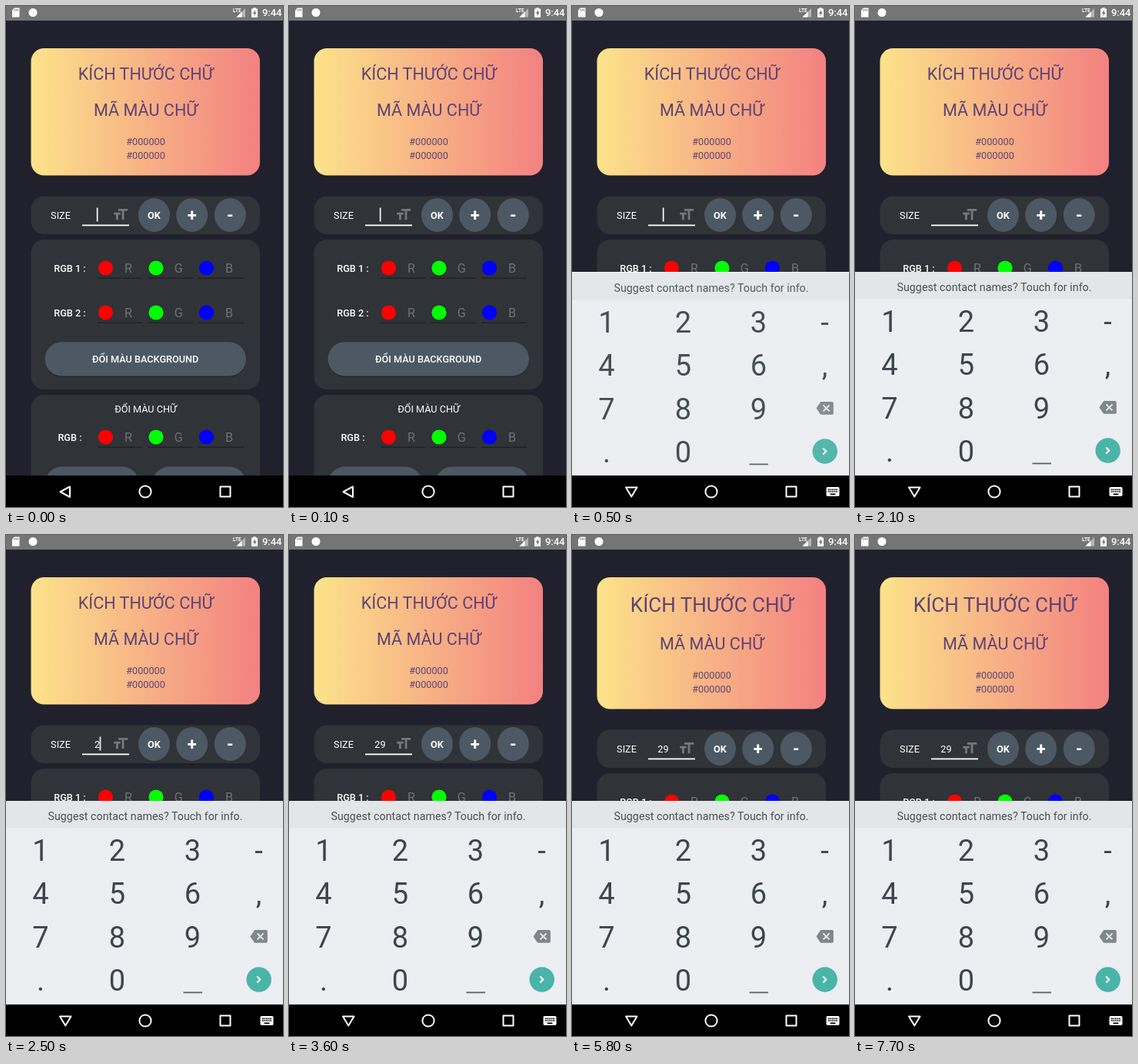
An HTML page that plays this animation: 360 px wide and 652 px high, repeating every 8 s.

```html
<!DOCTYPE html>
<html lang="vi">
<head>
<meta charset="utf-8">
<title>Text size demo</title>
<style>
html, body { margin: 0; width: 100%; height: 100%; overflow: hidden; background: #21212d; }
svg { display: block; width: 100vw; height: 100vh; }
text { font-family: Roboto, "Noto Sans", sans-serif; font-size: 12.7px; text-anchor: middle; fill: #fff; }
.m { font-weight: 500; }
.b { font-weight: 700; }
.sign { font-size: 22px; font-weight: 700; }
.card text { fill: #5d4374; }
.card .big { font-size: 21.6px; }
.hint { font-size: 16.2px; fill: #707275; }
.panel { fill: #303337; }
.btn { fill: #4c5864; }
.keys text { font-size: 38px; fill: #3c464b; }
.keys .tip { font-size: 14.3px; fill: #4a5256; }
.line { fill: none; stroke: #fff; stroke-width: 2; }

.grow, .tall, .shift, .caret, .one, .two, .press, .kb, .slide, .glass, .down, .back {
  animation: 8s step-end infinite;
}
.grow { animation-name: grow; }
.tall { animation-name: tall; }
.shift { animation-name: shift; }
.caret { animation-name: caret; }
.one { animation-name: one; }
.two { animation-name: two; }
.press { animation-name: press; }
.kb, .down { animation-name: show; }
.back { animation-name: hide; }
.slide { animation-name: slide; }
.glass { animation-name: glass; }

@keyframes grow {
  0% { font-size: 21.6px; transform: translateY(0); }
  72.5%, 96.25%, 100% { font-size: 26px; transform: translateY(4.2px); }
  93.75% { font-size: 26.9px; transform: translateY(5px); }
}
@keyframes tall {
  0% { height: 165.5px; }
  72.5%, 96.25%, 100% { height: 171.5px; }
  93.75% { height: 172.5px; }
}
@keyframes shift {
  0% { transform: translateY(0); }
  72.5%, 96.25%, 100% { transform: translateY(6px); }
  93.75% { transform: translateY(7px); }
}
@keyframes caret {
  0%, 20% { opacity: 1; transform: translateX(0); }
  13.75%, 26.25% { opacity: 0; transform: translateX(0); }
  28.75% { opacity: 1; transform: translateX(3.7px); }
  35% { opacity: 0; transform: translateX(3.7px); }
  38.75%, 51.25%, 63.75%, 76.25%, 88.75% { opacity: 1; transform: translateX(7.3px); }
  45%, 57.5%, 70%, 82.5%, 95%, 100% { opacity: 0; transform: translateX(7.3px); }
}
@keyframes one {
  0%, 38.75%, 100% { visibility: hidden; }
  28.75% { visibility: visible; }
}
@keyframes two {
  0% { visibility: hidden; }
  38.75%, 100% { visibility: visible; }
}
@keyframes press {
  0%, 28.75%, 100% { opacity: 0; }
  27.5% { opacity: 1; }
}
@keyframes show {
  0% { visibility: hidden; }
  5%, 100% { visibility: visible; }
}
@keyframes hide {
  0% { visibility: visible; }
  5%, 100% { visibility: hidden; }
}
@keyframes slide {
  0%, 5% { transform: translateY(40px); opacity: .6; }
  6.25% { transform: translateY(1px); opacity: .95; }
  7.5%, 100% { transform: translateY(0); opacity: 1; }
}
@keyframes glass {
  0%, 6.25%, 100% { visibility: hidden; }
  5% { visibility: visible; }
}
</style>
</head>
<body>
<svg viewBox="0 0 360 652" preserveAspectRatio="none">
  <defs>
    <linearGradient id="warm">
      <stop offset="0" stop-color="#fce38a"/>
      <stop offset="1" stop-color="#f38181"/>
    </linearGradient>
    <clipPath id="kbArea"><rect y="346" width="360" height="265"/></clipPath>
    <clipPath id="navArea"><rect y="611" width="360" height="41"/></clipPath>

    <g id="row">
      <circle cx="129.5" r="9.6" fill="#f00"/>
      <circle cx="195" r="9.6" fill="#0f0"/>
      <circle cx="260.5" r="9.6" fill="#00f"/>
      <text class="hint" x="159" y="6">R</text>
      <text class="hint" x="224.3" y="6">G</text>
      <text class="hint" x="290" y="6">B</text>
      <path d="M119 13.2h58M184.500 13.2h58M250 13.2h59" stroke="#212326" stroke-width="1.4"/>
    </g>

    <g id="keys" class="keys">
      <rect y="346" width="360" height="306" fill="#eceef1"/>
      <rect y="346" width="360" height="35.500" fill="#e3e6e8"/>
      <rect class="press" x="98" y="386" width="92" height="45" rx="3" fill="#d3d7da"/>
      <text class="tip" x="181" y="371">Suggest contact names? Touch for info.</text>
      <text x="45" y="423.500">1</text>
      <text x="144.500" y="423.500">2</text>
      <text x="242.500" y="423.500">3</text>
      <text x="328.500" y="423.500">-</text>
      <text x="45" y="480">4</text>
      <text x="144.500" y="480">5</text>
      <text x="242.500" y="480">6</text>
      <text x="328.500" y="480">,</text>
      <text x="45" y="536.500">7</text>
      <text x="144.500" y="536.500">8</text>
      <text x="242.500" y="536.500">9</text>
      <text x="45" y="593">.</text>
      <text x="144.500" y="593">0</text>
      <rect x="230.500" y="594.500" width="24.500" height="1.8" fill="#5b6367"/>
      <path transform="translate(317.500 511.300) scale(.93)" fill="#80878b" d="M22 3H7c-.69 0-1.23.35-1.59.88L0 12l5.41 8.11c.36.53.9.89 1.59.89h15c1.100 0 2-.9 2-2V5c0-1.100-.9-2-2-2zm-3 12.590L17.590 17 14 13.410 10.410 17 9 15.590 12.590 12 9 8.410 10.410 7 14 10.590 17.590 7 19 8.410 15.410 12z"/>
      <circle cx="328.700" cy="578.500" r="16.200" fill="#4bb4a8"/>
      <path class="line" d="M326.300 574.500l4 4-4 4"/>
    </g>
  </defs>

  <rect width="360" height="652" fill="#21212d"/>

  <!-- preview card -->
  <g class="card">
    <rect class="tall" x="32.500" y="55" width="297.500" height="165.500" rx="17" fill="url(#warm)"/>
    <text class="big grow" x="181.700" y="96.300">KÍCH THƯỚC CHỮ</text>
    <g class="shift">
      <text class="big" x="181.700" y="143.300">MÃ MÀU CHỮ</text>
      <text x="181.500" y="181">#000000</text>
      <text x="181.500" y="199">#000000</text>
    </g>
  </g>

  <!-- controls -->
  <g class="shift">
    <rect class="panel" x="32.500" y="247.500" width="297.500" height="49.500" rx="17"/>
    <text x="71" y="277">SIZE</text>
    <rect x="99" y="284.500" width="61" height="1.8" fill="#fff"/>
    <text class="one" x="118.500" y="276.500">2</text>
    <text class="two" x="118.500" y="276.500">29</text>
    <rect class="caret" x="117.800" y="262.500" width="1.7" height="18" fill="#fff"/>
    <path transform="translate(137.300 260.200) scale(.95)" fill="#76787b" d="M9 4v3h5v12h3V7h5V4zM3 12h3v7h3v-7h3V9H3z"/>
    <g class="btn">
      <ellipse cx="192.500" cy="272" rx="20.500" ry="22"/>
      <ellipse cx="241.700" cy="272" rx="20.500" ry="22"/>
      <ellipse cx="291.300" cy="272" rx="20.500" ry="22"/>
    </g>
    <text class="b" x="192.500" y="276.700">OK</text>
    <text class="sign" x="241.700" y="280">+</text>
    <text class="sign" x="291.300" y="280">-</text>

    <rect class="panel" x="32.500" y="304" width="297.500" height="195" rx="17"/>
    <text class="m" x="83" y="346">RGB 1 :</text>
    <use href="#row" y="341"/>
    <text class="m" x="83" y="404">RGB 2 :</text>
    <use href="#row" y="399"/>
    <rect x="50.500" y="438.500" width="261.500" height="44.500" rx="22" fill="#26292d"/>
    <rect class="btn" x="50.500" y="437.300" width="261.500" height="44.200" rx="22"/>
    <text class="m" x="181.200" y="464.300">ĐỔI MÀU BACKGROUND</text>

    <rect class="panel" x="32.500" y="506" width="297.500" height="160" rx="17"/>
    <text x="181.500" y="528.700">ĐỔI MÀU CHỮ</text>
    <text class="m" x="83" y="566">RGB :</text>
    <use href="#row" y="561"/>
    <rect class="btn" x="50.500" y="599.500" width="122.500" height="44" rx="22"/>
    <rect class="btn" x="190" y="599.500" width="122" height="44" rx="22"/>
  </g>

  <!-- status bar -->
  <rect width="360" height="19" fill="#757575"/>
  <path d="M11 2.500h6.500v12H8v-9z" fill="#fff"/>
  <path d="M11.500 4v2.500M13.500 4v2.500M15.500 4v2.500" stroke="#757575"/>
  <circle cx="35" cy="8.500" r="5.500" fill="#fff"/>
  <text class="b" x="300.300" y="8" style="font-size:6.500px">LTE</text>
  <path d="M311 3v11.500H299.500z" fill="#b4b4b4"/>
  <path d="M306.500 7.500v7h-7z" fill="#fff"/>
  <path d="M321.300 3.500V2.300h3.400v1.200h2.300v11.200h-8V3.500z" fill="#fff"/>
  <path d="M323.800 5l-3 4.800h1.800v3.400l3-4.900h-1.800z" fill="#757575"/>
  <text class="m" x="345.700" y="13.300" style="font-size:13px">9:44</text>

  <!-- keyboard -->
  <g class="kb" clip-path="url(#kbArea)">
    <rect y="346" width="360" height="265" fill="#fafbfc"/>
    <g class="slide"><use href="#keys"/></g>
  </g>

  <!-- navigation bar -->
  <rect y="611" width="360" height="41" fill="#000"/>
  <g class="glass" clip-path="url(#navArea)">
    <use href="#keys" y="40"/>
    <rect y="611" width="360" height="41" opacity=".4"/>
  </g>
  <g class="line" stroke-linejoin="round">
    <path class="back" d="M83 625.500v13.500l-12.500-6.750z"/>
    <path class="down" d="M70 626.500h14.500l-7.250 12z"/>
    <circle cx="181" cy="632" r="7.600"/>
    <rect x="278.500" y="625.500" width="13" height="13"/>
  </g>
  <path class="down" transform="translate(328.800 621.800) scale(.85)" fill="#fff" d="M20 5H4c-1.100 0-2 .9-2 2v10c0 1.100.9 2 2 2h16c1.100 0 2-.9 2-2V7c0-1.100-.9-2-2-2zm-9 3h2v2h-2zm0 3h2v2h-2zM8 8h2v2H8zm0 3h2v2H8zm-1 2H5v-2h2zm0-3H5V8h2zm9 7H8v-2h8zm0-4h-2v-2h2zm0-3h-2V8h2zm3 3h-2v-2h2zm0-3h-2V8h2z"/>
</svg>
</body>
</html>
```
